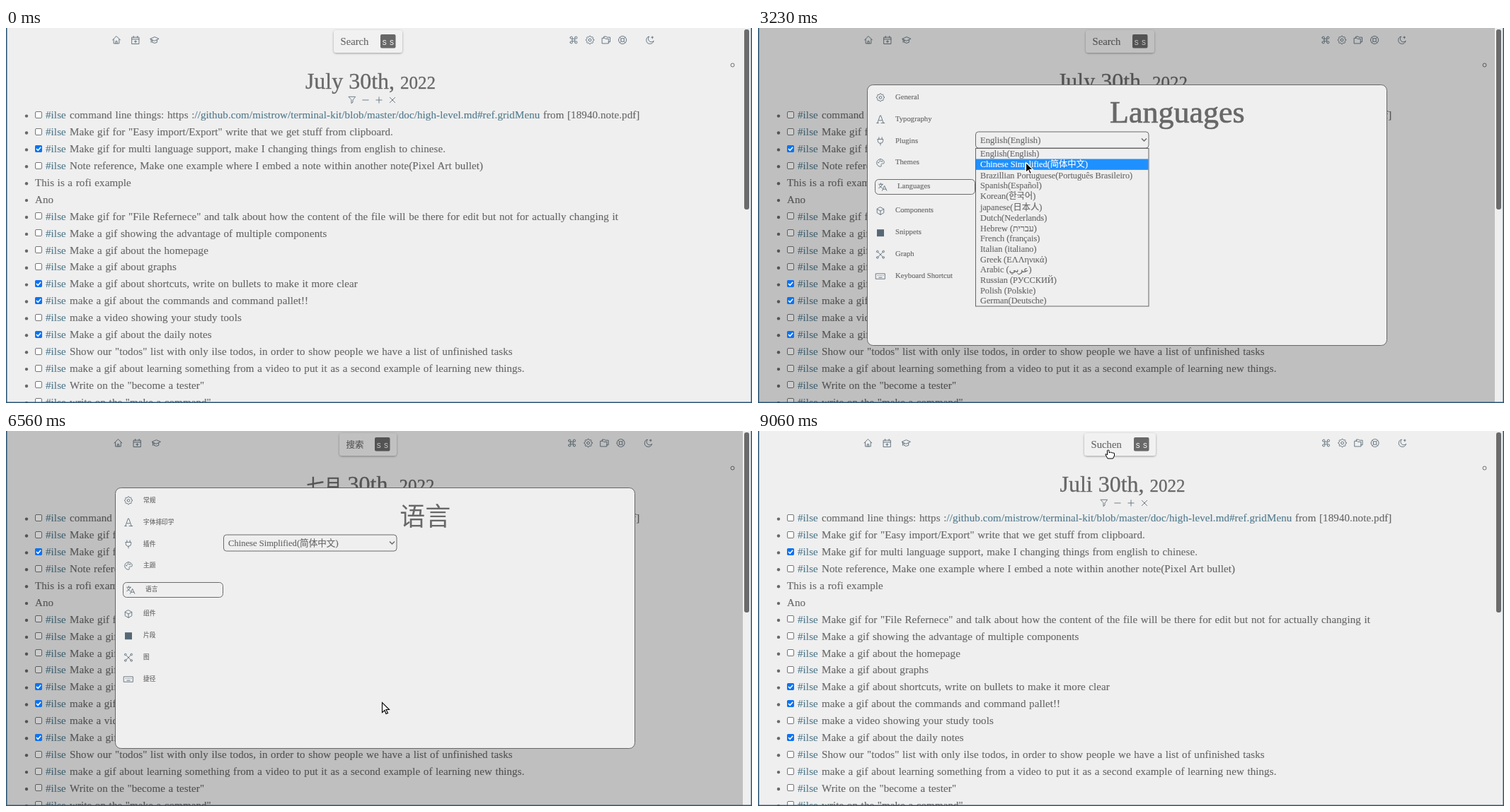
These frames come from a looping animation (1054x531 px, 9440 ms). An HTML page:

```html
<!DOCTYPE html>
<html lang="en">
<head>
<meta charset="utf-8">
<title>Language settings</title>
<style>
html, body { margin: 0; width: 100%; height: 100%; overflow: hidden; background: #efefef; }
svg { display: block; }
text { font-family: 'Liberation Serif', 'Noto Sans CJK SC', 'DejaVu Sans', serif; fill: #686868; stroke: #686868; stroke-width: .15; white-space: pre; }
.row { font-size: 15px; letter-spacing: .1px; word-spacing: .7px; }
.tag { fill: #547c8e; stroke: #547c8e; }
.day { font-size: 32px; text-anchor: middle; stroke-width: .3; }
.small { font-size: 25px; }
.head { font-size: 44px; text-anchor: middle; stroke-width: .7; }
.head.zh { font-size: 36px; stroke-width: 0; }
.side { font-size: 10.7px; }
.side.zh { font-size: 8.7px; }
.find { font-size: 14.7px; }
.find.zh { font-size: 12.5px; }
.key { font: 12px 'Liberation Sans', sans-serif; fill: #f0f0f0; stroke: none; text-anchor: middle; word-spacing: 1px; }
.pick { font-size: 12.6px; }
.opt { font-size: 12.3px; }
.on { fill: #fff; stroke: #fff; }
.icon { fill: none; stroke: #566875; stroke-width: 1.6; stroke-linecap: round; stroke-linejoin: round; }
.line { fill: none; stroke: #6b6b6b; }
</style>
</head>
<body>
<svg width="1054" height="531" viewBox="0 0 1054 531">
  <defs>
    <filter id="soft" x="-10%" y="-20%" width="120%" height="160%">
      <feDropShadow dx="0" dy="1" stdDeviation="1.5" flood-opacity=".35"/>
    </filter>
  </defs>
  <rect width="1054" height="531" fill="#efefef"/>
  <g id="list"></g>
  <g id="top"></g>
  <g id="veil">
    <rect x="1" width="1040" height="530" fill="#000" fill-opacity=".2"/>
    <g id="modal"></g>
  </g>
  <g id="ticks"></g>
  <rect x="1043" y="2" width="7" height="255" rx="3" fill="#6b6b6b"/>
  <path d="M.5 0V530.5H1053.5V0" fill="none" stroke="#285577" stroke-width="2"/>
  <g id="cursor"></g>
</svg>
<script>
const LOOP = 9440;
const $ = id => document.getElementById(id);
const clamp = v => Math.max(0, Math.min(1, v));
const ease = k => k * k * (3 - 2 * k);
const within = (t, a, b) => t >= a && t < b;
const text = (x, y, s, cls) => `<text x="${x}" y="${y}" class="${cls}">${s}</text>`;

// icons live on a 24 unit grid
const ring = (x, y, r) => `M${x - r} ${y}a${r} ${r} 0 1 0 ${2 * r} 0a${r} ${r} 0 1 0 ${-2 * r} 0`;
const corners = (d, r) => [-d, d].map(x => [-d, d].map(y => ring(12 + x, 12 + y, r)).join('')).join('');
const turn = (n, make) => Array.from({ length: n }, (_, i) => make(i, i * 2 * Math.PI / n));
const at = (a, r) => `${(12 + r * Math.cos(a)).toFixed(1)} ${(12 + r * Math.sin(a)).toFixed(1)}`;
const spokes = (n, r, R) => turn(n, (i, a) => `M${at(a + Math.PI / 4, r)}L${at(a + Math.PI / 4, R)}`).join('');
const ICONS = {
  home: 'M2 12 12 2 22 12M5 10V21H19V10M10 21V15H14V21',
  date: 'M3 5H21V22H3zM3 10H21M7 2V6M17 2V6M12 13v6M9 16h6',
  cap: 'M1 9 12 4 23 9 12 14zM6 12v6q6 4 12 0V12M3 10v8',
  cmd: 'M9 9h6v6H9z' + corners(6, 3),
  gear: 'M' + turn(32, (i, a) => at(a - .1, i % 4 < 2 ? 10.5 : 8.3)).join('L') + 'z' + ring(12, 12, 3.5),
  files: 'M6 7V3h6l2 2h8V17H18M2 7H8l2 2h8V21H2z',
  help: ring(12, 12, 10) + ring(12, 12, 4.5) + spokes(4, 4.5, 10),
  moon: 'M21 15A9.5 9.5 0 1 1 10 3 8 8 0 0 0 21 15zM18 3v5M15 5h5',
  funnel: 'M3 3H21L14 12V18L10 21V12z',
  minus: 'M4 12H20',
  plus: 'M4 12H20M12 4V20',
  cross: spokes(4, 0, 10),
  type: 'M2 22H7M14 22H23M4 22 11 2H13L20 22M8 15H16',
  plug: 'M8 2V7M16 2V7M5 7H19V11a7 7 0 0 1-14 0zM12 18V23',
  paint: 'M12 2a10 10 0 1 0 0 20c3 0 3-3 2-4s0-4 3-4h2a3 3 0 0 0 3-3A10 9 0 0 0 12 2z' + ring(7, 11, 1) + ring(11, 7, 1) + ring(16, 8, 1),
  lang: 'M2 5H13M7 2V5M11 5C10 10 7 13 2 15M4 8c1 3 4 6 7 7M11 22 17 9 23 22M13 18H21',
  cube: 'M12 2 21 7V17L12 22 3 17V7zM3 7 12 12 21 7M12 12V22',
  graph: corners(8, 2.5) + spokes(4, 0, 8.5),
  keys: 'M0 5H24V19H0z' + [5, 10, 14, 19].map(x => `M${x} 10h.5`).join('') + 'M8 15h8'
};
const icon = (name, x, y, k = .55) =>
  `<path class="icon" d="${ICONS[name]}" transform="translate(${x} ${y}) scale(${k}) translate(-12 -12)"/>`;

const TODOS = `[ ] command line things: https :<tspan class="tag">//github.com/mistrow/terminal-kit/blob/master/doc/high-level.md#ref.gridMenu</tspan> from [18940.note.pdf]
[ ] Make gif for "Easy import/Export" write that we get stuff from clipboard.
[x] Make gif for multi language support, make I changing things from english to chinese.
[ ] Note reference, Make one example where I embed a note within another note(Pixel Art bullet)
This is a rofi example
Ano
[ ] Make gif for "File Refernece" and talk about how the content of the file will be there for edit but not for actually changing it
[ ] Make a gif showing the advantage of multiple components
[ ] Make a gif about the homepage
[ ] Make a gif about graphs
[x] Make a gif about shortcuts, write on bullets to make it more clear
[x] make a gif about the commands and command pallet!!
[ ] make a video showing your study tools
[x] Make a gif about the daily notes
[ ] Show our "todos" list with only ilse todos, in order to show people we have a list of unfinished tasks
[ ] make a gif about learning something from a video to put it as a second example of learning new things.
[ ] Write on the "become a tester"
[ ] write on the "make a command"`.split('\n');

const LANGS = {
  en: { find: 'Search', width: 97, month: 'July', title: ['General', 'Languages'], value: 0,
    side: ['General', 'Typography', 'Plugins', 'Themes', 'Languages', 'Components', 'Snippets', 'Graph', 'Keyboard Shortcut'] },
  zh: { find: '搜索', width: 81, month: '<tspan class="small">七月</tspan>', title: ['常规', '语言'], value: 1,
    side: ['常规', '字体排印学', '插件', '主题', '语言', '组件', '片段', '图', '捷径'] },
  de: { find: 'Suchen', width: 101, month: 'Juli', title: ['Allgemein', 'Sprachen'], value: 14,
    side: ['Allgemein', 'Typographie', 'Plugins', 'Themen', 'Sprachen', 'Komponenten', 'Schnipsel', 'Graph', 'Tastaturkurzbefehl'] }
};
const SIDE_ICONS = ['gear', 'type', 'plug', 'paint', 'lang', 'cube', '', 'graph', 'keys'];
const OPTIONS = ['English(English)', 'Chinese Simplified(简体中文)', 'Brazillian Portuguese(Português Brasileiro)',
  'Spanish(Español)', 'Korean(한국어)', 'japanese(日本人)', 'Dutch(Nederlands)', 'Hebrew (עברית)', 'French (français)',
  'Italian (italiano)', 'Greek (ΕΛΛηνικά)', 'Arabic (عربي)', 'Russian (РУССКИЙ)', 'Polish (Polskie)', 'German(Deutsche)'];

// rows with East Asian glyphs are a little taller
let edge = 170.7;
const optY = OPTIONS.map(s => {
  const h = /[\u3000-\ud7af]/.test(s) ? 15.65 : 14.65;
  edge += h;
  return edge - h / 2;
});

const rowY = i => 124 + 23.9 * i;

function drawRow(s, i) {
  const y = rowY(i), base = y + 4.3;
  const dot = `<circle cx="29" cy="${y + .6}" r="2.2" fill="#686868"/>`;
  if (s[0] !== '[') return dot + text(41, base, s, 'row');
  return dot + `<rect x="41.5" y="${Math.round(y) - 5.5}" width="9" height="9" rx="1.5" fill="#fff" stroke="#767676"/>` +
    text(56, base, '#ilse', 'row tag') + text(90, base, s.slice(4), 'row');
}

function drawTick(s, i) {
  const y = Math.round(rowY(i)) - 1;
  return s[1] !== 'x' ? '' : `<rect x="41" y="${y - 5}" width="10" height="10" rx="2" fill="#0b73f3"/>` +
    `<path d="M43 ${y}l2.2 2.3 4-4.6" fill="none" stroke="#fff" stroke-width="1.5"/>`;
}

function drawTop(lang) {
  const { find, width, month } = LANGS[lang];
  const left = 511.5 - width / 2, badge = left + width - 31, shift = (97 - width) * .15;
  return ['home', 'date', 'cap'].map((n, i) => icon(n, 156 + 27 * i + shift, 17)).join('') +
    ['cmd', 'gear', 'files', 'help'].map((n, i) => icon(n, 802 + 23 * i - shift, 17)).join('') +
    icon('moon', 910 - shift, 17) +
    `<rect x="${left}" y="3" width="${width}" height="32" rx="4" fill="#f1f1f1" filter="url(#soft)"/>` +
    text(left + 9.5, 24, find, 'find ' + lang) +
    `<rect x="${badge}" y="9" width="21.5" height="19.5" rx="2" fill="#686868"/>` +
    text(badge + 10.8, 23.5, 's s', 'key') +
    text(515, 85.5, month + ' 30th, <tspan class="small">2022</tspan>', 'day');
}

function drawSide(lang, page) {
  return LANGS[lang].side.map((s, i) => {
    const sel = page && i === 4, x = sel ? 176 : 173;
    const y = 97.2 + 30.85 * i + (sel ? 3.2 : page && i > 4 ? 6.4 : 0);
    return (sel ? '<rect class="line" x="165.5" y="214.5" width="141" height="21" rx="5"/>' : '') +
      (SIDE_ICONS[i] ? icon(SIDE_ICONS[i], x, y + 1.2, .53)
        : `<rect x="${x - 5}" y="${y - 3.5}" width="10" height="10" fill="#566875"/>`) +
      text(x + 21, y + 3.6, s, 'side ' + lang);
  }).join('');
}

function drawModal(lang, page, hover) {
  const L = LANGS[lang];
  let out = '<rect x="154.5" y="80.5" width="734" height="369" rx="8" fill="#efefef" stroke="#666"/>' +
    drawSide(lang, page) + text(592.3, 133.5, L.title[page], 'head ' + lang);
  if (page) out += '<rect class="line" x="307.5" y="147" width="244.5" height="23" rx="4"/>' +
    '<path class="line" stroke-width="1.5" d="M542 156.5l3.5 3.5 3.5-3.5"/>' + text(314, 163, OPTIONS[L.value], 'pick');
  if (hover >= 0) out += '<rect x="307.5" y="170.5" width="244.5" height="223.5" fill="#efefef" stroke="#666"/>' +
    `<rect x="308" y="${optY[hover] - 7.7}" width="243.5" height="15.4" fill="#1e90ff"/>` +
    OPTIONS.map((s, i) => text(314, optY[i] + 4.2, s, i === hover ? 'opt on' : 'opt')).join('');
  return out;
}

// pointer moves: from ms, to ms, end x, end y, sideways sway
const MOVES = [
  [110, 670, 819, 21], [910, 1060, 648, 93], [1200, 1570, 167, 333], [1770, 2100, 215, 227],
  [2290, 2880, 385, 160], [2880, 3230, 378, 190], [3550, 4010, 382, 205], [4580, 5100, 357, 162],
  [5460, 6160, 531, 384], [6560, 7320, 630, 296], [7320, 8230, 630, 192, 70], [8230, 8270, 633, 171],
  [8350, 9060, 495, 27]
];

function pointer(t) {
  let x = 577, y = 179;
  for (const [a, b, u, v, sway = 0] of MOVES) {
    const k = ease(clamp((t - a) / (b - a)));
    x += (u - x) * k + sway * Math.sin(2 * Math.PI * k);
    y += (v - y) * k;
  }
  return [x, y];
}

const arrow = (fill, rim) =>
  `<path d="M.5 .5V14.5L4 11.5 6 16.5 8.5 15.500 6 10.500H10.500z" fill="${fill}" stroke="${rim}" stroke-width="1.1"/>`;
const SHAPES = {
  none: '',
  light: arrow('#fff', '#000'),
  dark: arrow('#000', '#fff'),
  hand: '<path d="M1 .5q-2-1-2.500 0V7l-1-1q-2-1-1.500 .5L-1 12H6.500L8.500 8V4.500q-1-1-2 0V4q-1-1-2 0V3.500q-1-1-2 0H1z" fill="#fff" stroke="#000"/>'
};

const drawn = {};
function put(id, key, make) {
  if (drawn[id] === key) return;
  drawn[id] = key;
  $(id).innerHTML = make();
}

function frame() {
  const t = (performance.now() - start) % LOOP;
  const lang = t < 4320 ? 'en' : t < 6600 ? 'zh' : 'de';
  const page = t < 2290 ? 0 : 1;
  const [x, y] = pointer(t);

  let hover = -1;
  if (within(t, 2850, 3750) || within(t, 5460, 6160)) {
    const near = optY.findIndex(c => y < c + 7.4);
    hover = y < 171 ? LANGS[lang].value : near < 0 ? 14 : near;
  }

  put('top', lang, () => drawTop(lang));
  put('modal', lang + page + hover, () => drawModal(lang, page, hover));
  const shown = t < 910 ? 0 : Math.min(clamp((t - 860) / 200), clamp((8900 - t) / 130));
  $('veil').setAttribute('opacity', shown);

  const hand = within(t, 600, 940) || within(t, 2060, 2380) || t > 8960;
  const dark = within(t, 2880, 4150) || within(t, 5500, 6160);
  const kind = t < 110 ? 'none' : hand ? 'hand' : dark ? 'dark' : 'light';
  put('cursor', kind, () => SHAPES[kind]);
  $('cursor').setAttribute('transform', `translate(${x.toFixed(1)} ${y.toFixed(1)})`);
  requestAnimationFrame(frame);
}

$('list').innerHTML = TODOS.map(drawRow).join('') +
  ['funnel', 'minus', 'plus', 'cross'].map((n, i) => icon(n, 489 + 19 * i, 102, .52)).join('') +
  '<circle class="line" cx="1026.5" cy="52.5" r="2.5"/>';
$('ticks').innerHTML = TODOS.map(drawTick).join('');
const start = performance.now();
frame();
</script>
</body>
</html>
```
